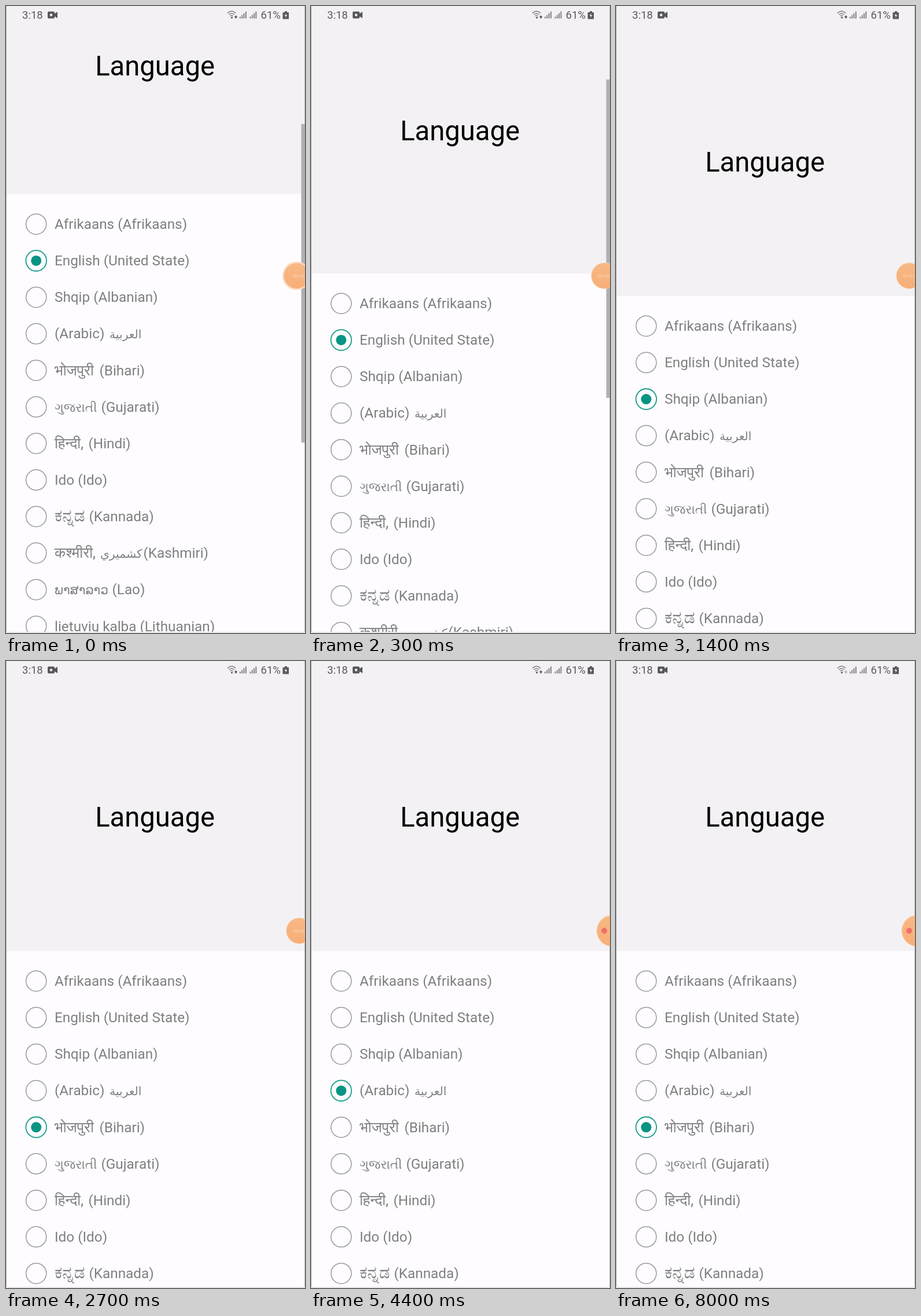
An HTML page for the animation above (8100 ms loop, 517 by 1083 pixels).

```html
<!DOCTYPE html>
<html lang="en">
<head>
<meta charset="utf-8">
<title>Language</title>
<style>
  html, body { margin: 0; width: 100%; height: 100%; overflow: hidden; background: #fefcff; }
  svg { display: block; width: 100vw; height: 100vh; }
  text { font-family: Roboto, "Noto Sans", sans-serif; white-space: pre; font-kerning: none; }
  #rows text { fill: #7f7f81; }
  #status text { font-size: 18.5px; fill: #58575a; }
</style>
</head>
<body>
<svg viewBox="0 0 517 1083">
  <defs>
    <linearGradient id="orange" x1="0" y1="0" x2="0" y2="1">
      <stop offset="0" stop-color="#f8b885"/>
      <stop offset="1" stop-color="#f7ae78"/>
    </linearGradient>
    <clipPath id="screen"><rect width="517" height="1081"/></clipPath>
  </defs>
  <rect width="517" height="1083" fill="#fefcff"/>
  <rect id="header" width="517" height="325" fill="#f3f1f4"/>
  <text id="title" x="154.2" font-size="47.2">Language</text>
  <g clip-path="url(#screen)"><g id="rows"></g></g>

  <g id="status" fill="#58575a">
    <text x="28" y="22">3:18</text>
    <path d="M74 9.5h8q2 0 2 2v1.5l5-3v11l-5-3v1.5q0 2-2 2h-8q-2 0-2-2v-8q0-2 2-2z"/>
    <circle cx="78" cy="15.5" r="2.2" fill="#f3f1f4"/>
    <g fill="none" stroke="#7f7e81" stroke-width="1.5">
      <path d="M383 12.5q7-7 14 0M385.5 15q4.5-4.5 9 0M387.5 17.5q2.5-2.5 5 0"/>
    </g>
    <circle cx="390.5" cy="20" r="1.6"/>
    <path id="traffic" d="M397.5 16l3 3.5h-2v2h-2v-2h-2z"/>
    <g id="bars" opacity=".8"></g>
    <text x="440.5" y="22">61%</text>
    <path d="M482 9h4v2h3v11.5h-10.500v-11.5h3.5z"/>
    <path d="M484.5 12.5l-3 4.5h2.300l-.8 3.5 3.5-4.700h-2.5z" fill="#f3f1f4"/>
  </g>

  <rect id="scrollbar" x="510.5" width="6.5" height="550" fill="#b0afb1"/>
  <path d="M.5 0V1083M516.7 0V1083" stroke="#a9a8aa" stroke-width=".9"/>
  <rect y="1081" width="517" height="2" fill="#e9e5e8"/>

  <circle id="halo" cy="466" fill="#fbdcc3"/>
  <circle id="bubble" cy="466" fill="url(#orange)"/>
  <text id="timer" x="496" y="469" font-size="8" fill="#fff1e4"></text>
  <circle id="record" cx="507" cy="466" r="5" fill="#f06f69"/>
</svg>
<script>
const LOOP = 8100, STEP = 100, ROW_HEIGHT = 63.13;
const LATIN = 24.3, ARABIC = 20.3, DEVANAGARI = 25.7, GUJARATI = 21.7, KANNADA = 29.5, LAO = 21.7;

// Each row: runs of [x, text, font size]
const languages = [
  [[84, 'Afrikaans (Afrikaans)']],
  [[84, 'English (United State)']],
  [[84, 'Shqip (Albanian)']],
  [[84, '(Arabic)'], [179, 'العربية', ARABIC]],
  [[84, 'भोजपुरी', DEVANAGARI], [161.5, '(Bihari)']],
  [[84, 'ગુજરાતી', GUJARATI], [164.5, '(Gujarati)']],
  [[84, 'हिन्दी,', DEVANAGARI], [142.5, '(Hindi)']],
  [[84, 'Ido (Ido)']],
  [[84, 'ಕನ್ನಡ', KANNADA], [143.5, '(Kannada)']],
  [[84, 'कश्मीरी,', DEVANAGARI], [163, 'كشميري', ARABIC], [237.5, '(Kashmiri)']],
  [[84, 'ພາສາລາວ', LAO], [183.5, '(Lao)']],
  [[84, 'lietuvių kalba (Lithuanian)']]
];
// [time in ms, selected row]
const taps = [[-1000, 1], [1300, 2], [1900, 4], [2800, 0], [4000, 3], [5900, 6], [6600, 5], [7800, 4]];

const byId = id => document.getElementById(id);
const clamp = v => Math.min(1, Math.max(0, v));
const mix = (a, b, k) => a + (b - a) * k;
const set = (el, attrs) => {
  for (const name in attrs) el.setAttribute(name, attrs[name]);
  return el;
};
const add = (parent, tag, attrs) =>
  parent.appendChild(set(document.createElementNS('http://www.w3.org/2000/svg', tag), attrs));

const radios = languages.map((runs, i) => {
  const y = 51.8 + i * ROW_HEIGHT;
  const rows = byId('rows');
  const ring = add(rows, 'circle', { cx: 52.2, cy: y, fill: 'none' });
  const dot = add(rows, 'circle', { cx: 52.2, cy: y, fill: '#079483' });
  for (const [x, label, size = LATIN] of runs)
    add(rows, 'text', { x, y: y + 8.3, 'font-size': size }).textContent = label;
  return { ring, dot };
});

for (const x of [404, 421.5])
  for (let i = 0; i < 4; i++) {
    const height = 3 + i * 3;
    add(byId('bars'), 'rect', { x: x + i * 3.3, y: 21.5 - height, width: 1.8, height });
  }

function selection(row, t) {
  let level = 0;
  for (const [start, target] of taps)
    if (t >= start) level = mix(level, row === target ? 1 : 0, clamp((t - start + STEP) / 200));
  return level;
}

function draw(t) {
  const remaining = 1 - clamp(t / 500);
  const headerHeight = 501 - 176 * remaining ** 1.645;
  set(byId('header'), { height: headerHeight });
  set(byId('title'), { y: 285.5 - 166 * remaining ** 1.227 });
  set(byId('rows'), { transform: `translate(0 ${headerHeight})` });
  set(byId('scrollbar'), {
    y: 105 + (501 - headerHeight) * 0.5625,
    opacity: 1 - clamp((t - 900) / 300)
  });

  radios.forEach(({ ring, dot }, i) => {
    const level = selection(i, t);
    const channel = (off, on) => Math.round(mix(off, on, level));
    set(ring, {
      r: mix(17.6, 17.8, level),
      stroke: `rgb(${channel(154, 20)},${channel(153, 156)},${channel(155, 138)})`,
      'stroke-width': mix(1.5, 1.8, level)
    });
    set(dot, { r: 9 * level });
  });

  const settled = clamp(t / 300);
  const docked = clamp((t - 3300) / 500);
  const cx = mix(mix(502.5, 507, settled), 521, docked);
  const r = mix(22, 26.5, docked);
  set(byId('bubble'), { cx, r });
  set(byId('halo'), { cx, r: r + mix(mix(2.5, 0.8, settled), 1.2, docked) });
  set(byId('timer'), { opacity: 0.6 * (1 - docked) });
  byId('timer').textContent = '00:0' + Math.floor((t + 500) / 1000);
  set(byId('record'), { opacity: docked });
  set(byId('traffic'), { opacity: t < 6500 ? 1 : 0.4 });
}

function tick(now) {
  draw(Math.floor((now % LOOP) / STEP) * STEP);
  requestAnimationFrame(tick);
}
draw(0);
requestAnimationFrame(tick);
</script>
</body>
</html>
```
